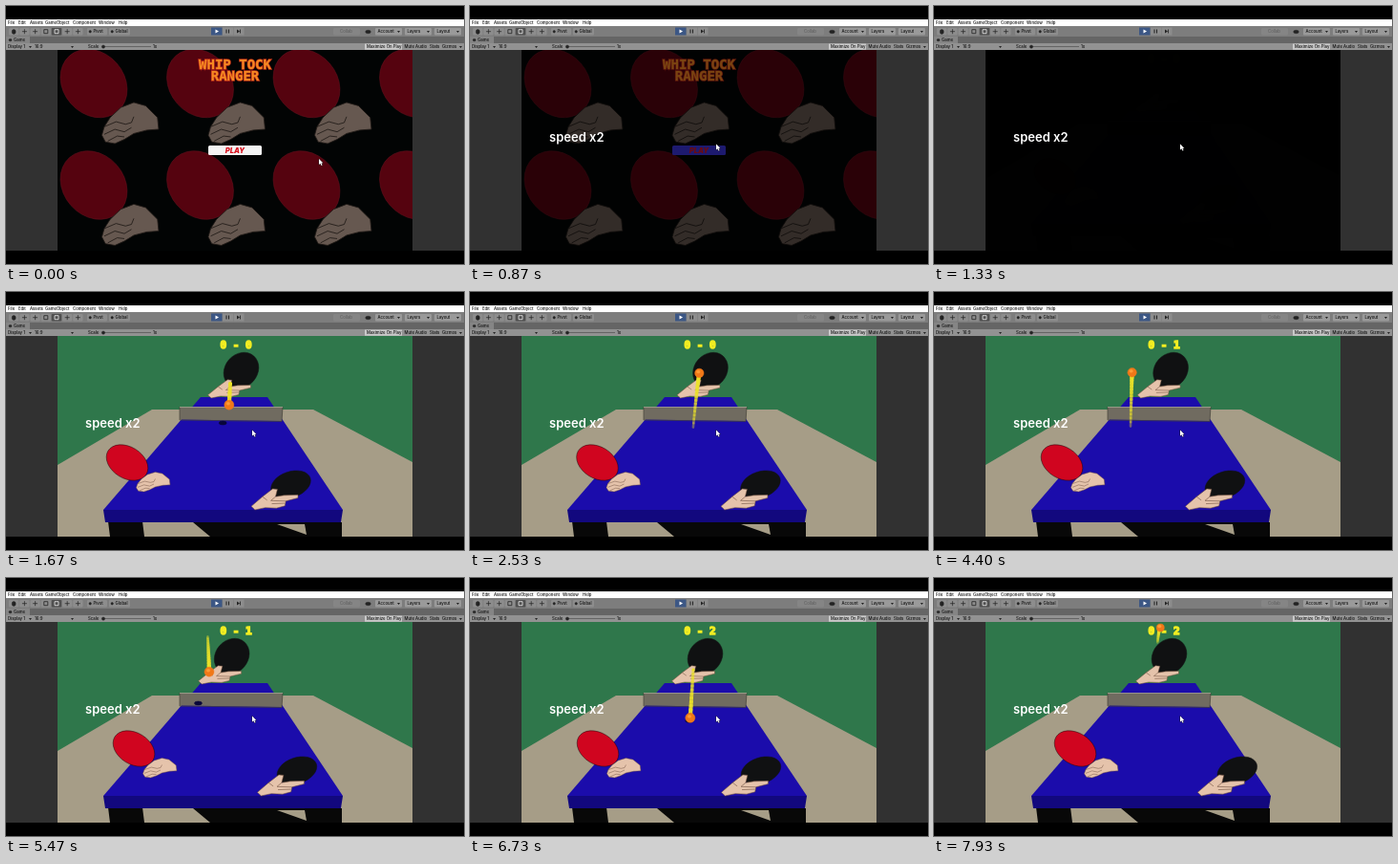
Animation of 480 by 270 pixels, one loop 8000 ms. Source, as an HTML page with a canvas:

```html
<!DOCTYPE html>
<html lang="en">
<head>
<meta charset="utf-8">
<title>Table tennis game</title>
<style>
html, body { margin: 0; width: 100%; height: 100%; overflow: hidden; background: #000; }
canvas { display: block; width: 100vw; height: 100vh; }
</style>
</head>
<body>
<canvas width="480" height="270"></canvas>
<script>
const ctx = document.querySelector('canvas').getContext('2d');
const LOOP = 8000, GAME_START = 1330, FADE = 260;
const VIEW = [54, 46, 372, 210];
const SANS = 'Inter, Roboto, sans-serif';
const MONO = '"DejaVu Sans Mono", monospace';

// Shots alternate: a drive towards the viewer, then a lob back. xs holds where each shot starts and ends.
const DRIVE = 450, LOB = 1600, TRAIL = 320;
const FAR_Y = 96, NEAR_Y = 190, APEX_Y = 52, APEX_AT = 0.63;
const rallies = [
  { serve: 1565, end: 3350, xs: [235, 230, 262] },
  { serve: 3430, end: 6250, xs: [250, 205, 213, 240] },
  { serve: 6490, end: LOOP, xs: [234, 228, 243] }
];
const rivalKeys = [[2000, 0], [3300, 15], [5400, -10], [6400, 0]];
const playerKeys = [[1700, 0], [2700, 7], [6800, 7], [7900, 21]];

const clamp = (v, lo = 0, hi = 1) => Math.min(hi, Math.max(lo, v));
const smooth = u => u * u * (3 - 2 * u);
const lerp = (a, b, u) => a + (b - a) * u;

function glide(keys, t) {
  const next = keys.findIndex(k => k[0] > t);
  if (next < 1) return keys.at(next)[1];
  const [t0, a] = keys[next - 1], [t1, b] = keys[next];
  return lerp(a, b, smooth((t - t0) / (t1 - t0)));
}

function ballAt({ serve, xs }, t) {
  const length = i => i % 2 ? LOB : DRIVE;
  let rest = Math.max(0, t - serve), shot = 0;
  while (shot < xs.length - 2 && rest > length(shot)) rest -= length(shot++);
  const u = rest / length(shot);
  const y = shot % 2
    ? APEX_Y + (NEAR_Y - APEX_Y) * (1 - u / APEX_AT) ** 2
    : lerp(FAR_Y, NEAR_Y, u);
  return [lerp(xs[shot], xs[shot + 1], u), y];
}

function rect(x, y, w, h, fill, r = 0) {
  ctx.fillStyle = fill;
  ctx.beginPath();
  ctx.roundRect(x, y, w, h, r);
  ctx.fill();
}

function poly(fill, ...points) {
  ctx.fillStyle = fill;
  ctx.beginPath();
  points.forEach(p => ctx.lineTo(...p));
  ctx.fill();
}

function ellipse(x, y, rx, ry, angle, fill, stroke = fill) {
  ctx.beginPath();
  ctx.ellipse(x, y, rx, ry, angle, 0, 7);
  ctx.fillStyle = fill;
  ctx.fill();
  ctx.strokeStyle = stroke;
  ctx.lineWidth = 0.5;
  ctx.stroke();
}

function line(color, width, ...points) {
  ctx.strokeStyle = color;
  ctx.lineWidth = width;
  ctx.beginPath();
  points.forEach(p => ctx.lineTo(...p));
  ctx.stroke();
}

function text(s, x, y, font, fill, align = 'left', outline) {
  ctx.font = font;
  ctx.textAlign = align;
  if (outline) {
    ctx.strokeStyle = outline;
    ctx.lineWidth = 1.5;
    ctx.strokeText(s, x, y);
  }
  ctx.fillStyle = fill;
  ctx.fillText(s, x, y);
}

// Hand outlines and creases in a 100 by 100 box.
const GRIP = {
  outline: new Path2D('M8 60L18 38L36 14L58 2L78 10L98 38L100 66L80 68L58 76L42 90L26 100L10 96L4 80Z'),
  creases: new Path2D('M8 60L28 48L44 54M8 78L26 66L42 72M14 94L30 82L42 84M44 54L54 50L58 36M42 72L54 62')
};
const POINT = {
  outline: new Path2D('M0 84L24 40L46 4L56 6L52 40L70 34L100 32L100 46L74 60L72 82L54 92L30 90L8 100Z'),
  creases: new Path2D('M52 40L42 58L74 60M44 72L72 70M24 40L34 56')
};

function hand(shape, x, y, w, h, skin, ink) {
  ctx.save();
  ctx.translate(x, y);
  ctx.scale(w / 100, h / 100);
  ctx.fillStyle = skin;
  ctx.fill(shape.outline);
  ctx.strokeStyle = ink;
  ctx.lineWidth = 1.6;
  ctx.stroke(shape.outline);
  ctx.stroke(shape.creases);
  ctx.restore();
}

function drawEditor() {
  const dark = '#222', button = '#8d8d8d';
  const label = (s, x, y, color = '#111') => text(s, x, y, `500 4.3px ${SANS}`, color);
  const arrow = (x, y) => poly(dark, [x, y], [x + 3, y], [x + 1.5, y + 2]);

  rect(0, 0, 480, 270, '#000');
  rect(0, 14, 480, 7.5, '#fff');
  rect(0, 21.5, 480, 10.5, '#7d7d7d');
  rect(0, 32, 480, 7, '#656565');
  rect(0, 32, 25, 7, '#858585');
  rect(0, 39, 480, 7, '#929292');
  rect(0, 46, 480, 210, '#313131');

  Object.entries({ File: 2, Edit: 13, Assets: 25, GameObject: 41, Component: 70, Window: 97, Help: 118 })
    .forEach(([s, x]) => label(s, x, 19.3));

  for (let i = 0; i < 7; i++) {
    const x = 3 + i * 11.2, m = x + 5.2, c = i === 4 ? '#eee' : dark;
    rect(x, 23, 10.4, 7.5, i === 4 ? '#505050' : button, 1);
    if (i === 0) ellipse(m, 27, 2, 2.4, 0, c);
    else if (i === 3 || i === 4) line(c, 0.8, [m - 2, 24.7], [m + 2, 24.7], [m + 2, 28.7], [m - 2, 28.7], [m - 2, 24.7]);
    else {
      line(c, 0.7, [m - 2.5, 26.7], [m + 2.5, 26.7]);
      line(c, 0.7, [m, 24.2], [m, 29.2]);
    }
  }
  [['Pivot', 85, 21], ['Global', 108, 22]].forEach(([s, x, w]) => {
    rect(x, 23, w, 7.5, button, 1);
    ellipse(x + 3.2, 26.8, 1.2, 1.2, 0, dark);
    label(s, x + 6.5, 28.4);
  });

  rect(215, 22.5, 11.5, 8, '#3c5785');
  rect(227, 22.5, 11, 8, button);
  rect(238.5, 22.5, 11, 8, button);
  poly('#fff', [219.5, 24.5], [223, 26.5], [219.5, 28.5]);
  rect(230.5, 24.6, 1, 4, dark);
  rect(233, 24.6, 1, 4, dark);
  poly(dark, [242, 24.5], [245, 26.5], [242, 28.5]);
  rect(245.2, 24.6, 0.8, 4, dark);

  rect(343, 23, 28, 7.5, '#858585', 1);
  label('Collab', 350, 28.4, '#636363');
  ellipse(379.5, 27, 2.8, 1.7, 0, dark);
  ['Account', 'Layers', 'Layout'].forEach((s, i) => {
    const x = 387 + i * 31;
    rect(x, 23, 28, 7.5, '#9a9a9a', 1);
    label(s, x + 2.5, 28.4);
    arrow(x + 23, 26);
  });

  ellipse(4.5, 35.6, 1.5, 1.2, 0, dark);
  label('Game', 8, 37.2);
  rect(101, 42.2, 51, 0.7, '#555');
  ellipse(102, 42.6, 1.6, 1.6, 0, dark);
  rect(376, 39.4, 39, 6.3, '#c9c9c9');
  Object.entries({ 'Display 1': 2, '16:9': 30, Scale: 86, '1x': 154,
    'Maximize On Play': 378, 'Mute Audio': 417.5, Stats: 444, Gizmos: 457 })
    .forEach(([s, x]) => label(s, x, 44.1));
  [24, 68, 475].forEach(x => arrow(x, 42));
}

function drawMenu(t) {
  const hovered = t > 760;
  rect(...VIEW, '#020404');
  for (let i = 0; i < 8; i++) {
    const x = 92 + i % 4 * 111.5, y = 81 + Math.floor(i / 4) * 106.5;
    ellipse(x, y, 38.5, 32, 0.85, '#55030f', '#6c1320');
    hand(GRIP, x + 6, y + 19, 62, 44, '#665850', '#201a17');
  }
  ['WHIP TOCK', 'RANGER'].forEach((s, i) =>
    text(s, 240, 65.5 + i * 12.5, `bold 14px ${MONO}`, '#f58a22', 'center', '#c2301a'));
  rect(212, 146, 56, 10, hovered ? '#3a34e0' : '#f4f4f4', 1.5);
  text('PLAY', 240, 153.6, `italic 900 7.5px ${SANS}`, '#d81521', 'center');
}

function drawTable() {
  const floor = '#a69d87', black = '#080808';
  rect(...VIEW, '#2f774b');
  poly(floor, [153, 123], [322, 123], [426, 178], [426, 256], [54, 256], [54, 181]);
  poly(black, [196, 241], [352, 241], [352, 256], [214, 256]);
  poly(floor, [284, 243], [313, 243], [315, 254]);
  poly(black, [107, 240], [143, 240], [145, 256], [109, 256]);
  poly('#1b0cab', [204, 110], [274, 110], [353, 228], [102, 228]);
  poly('#12087e', [102, 228], [353, 228], [351, 241], [104, 241]);
  poly('#706b60', [182, 120.5], [290, 120.5], [289, 135], [182, 133.5]);
  line('#454238', 0.7, [182, 120], [182, 134], [289, 135.5], [290, 120]);
  line('#aaa594', 0.8, [182, 120.5], [290, 120.5]);
}

function drawBall(rally, t) {
  const [x, y] = ballAt(rally, t);
  const shadowY = Math.max(131 + Math.max(0, y - 104) * 0.43, y + 3);
  if (y > 90 && shadowY < 226) ellipse(x - (shadowY - y) * 0.35, shadowY, 4, 2, 0, '#08063a');
  ctx.lineCap = 'round';
  for (let i = 16; i > 0; i--) {
    const [from, to] = [i, i - 1].map(n => ballAt(rally, t - TRAIL * n / 16));
    line(`rgba(236,226,40,${0.95 - i * 0.035})`, 4.5 - i * 0.12, from, to);
  }
  ctx.lineCap = 'butt';
  const r = clamp(3 + y * 0.02, 4, 5);
  ellipse(x, y, r, r, 0, '#f07818');
  ellipse(x - 1, y - 1.5, 1.8, 1.5, 0, '#ff9b35');
}

function drawGame(t) {
  const rival = glide(rivalKeys, t), player = glide(playerKeys, t), partner = player * 0.92;
  const skin = '#e5c3ab', ink = '#6d4d3d', black = '#101112';
  const points = Math.max(0, rallies.findLastIndex(r => t >= r.serve));
  const rally = rallies[points];

  drawTable();
  ellipse(246.5 + rival, 82, 20, 17, -0.85, black);
  hand(POINT, 211.5 + rival, 91, 45, 20, skin, ink);
  text(`0 - ${points}`, 241, 59, `bold 11px ${MONO}`, '#f2ed22', 'center', '#f2ed22');
  if (t >= rally.serve && t < rally.end) drawBall(rally, t);
  ellipse(127 + player, 178.5, 23.5, 16.5, 0.55, '#d0051f', '#16080a');
  hand(GRIP, 135 + player, 188, 37, 21, skin, ink);
  ellipse(298.5 + partner, 201.5, 21.5, 13.5, -0.33, black);
  hand(POINT, 257 + partner, 205, 49, 23, skin, ink);
}

function drawCursor(t) {
  const u = smooth(clamp((t - 100) / 660));
  const x = lerp(328, 258, u), y = lerp(160, 144.5, u);
  const shape = [[0, 0], [0, 6], [1.4, 4.8], [2.5, 7], [3.5, 6.5], [2.5, 4.4], [4.2, 4.3], [0, 0]]
    .map(([dx, dy]) => [x + dx, y + dy]);
  line('#222', 0.8, ...shape);
  poly('#fff', ...shape);
}

function draw(t) {
  const inMenu = t < GAME_START;
  drawEditor();
  ctx.save();
  ctx.beginPath();
  ctx.rect(...VIEW);
  ctx.clip();
  (inMenu ? drawMenu : drawGame)(t);
  const shade = inMenu ? clamp((t - 740) / FADE) : 1 - clamp((t - GAME_START) / FADE);
  rect(...VIEW, `rgba(0,0,0,${shade})`);
  ctx.restore();
  text('speed x2', 83, 142, `600 13px ${SANS}`, `rgba(255,255,255,${clamp((t - 400) / 200)})`);
  drawCursor(t);
}

const start = performance.now();
function tick() {
  draw((performance.now() - start) % LOOP);
  requestAnimationFrame(tick);
}
tick();
</script>
</body>
</html>
```
